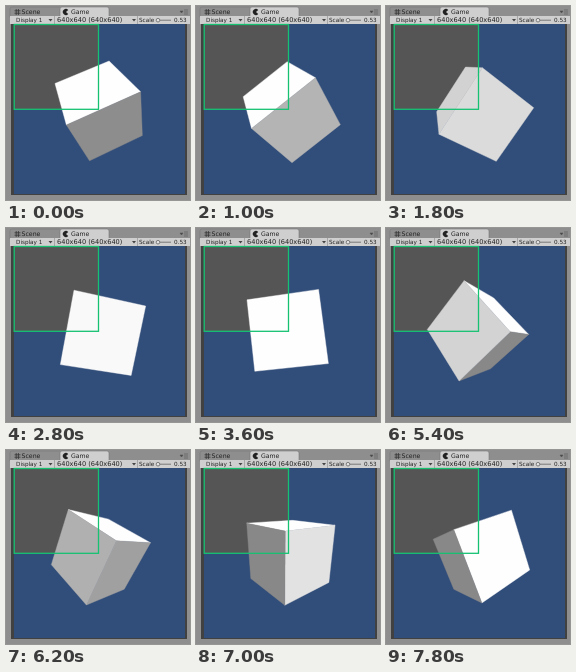
Write an HTML page that moves like this. It is 184 px wide and 194 px high and loops after 8000 ms.

```html
<!DOCTYPE html>
<html lang="en">
<head>
<meta charset="utf-8">
<title>Rotating cube</title>
<style>
html, body { margin: 0; width: 100%; height: 100%; overflow: hidden; background: #8e8e8e; }
svg { display: block; width: 184px; height: 194px; }
text { font: 6.6px "DejaVu Sans", sans-serif; fill: #222; }
.small { font-size: 5.7px; }
</style>
</head>
<body>
<svg viewBox="0 0 184 194">
  <!-- tabs -->
  <rect width="184" height="194" fill="#8e8e8e"/>
  <path d="M54 11V3q0-2 2-2h45q2 0 2 2v8z" fill="#cfcfcf" stroke="#777" stroke-width=".6"/>
  <path d="M4 11V3q0-2 2-2h48" fill="none" stroke="#777" stroke-width=".6"/>
  <path d="M10.2 3v6M12.4 3v6M8.5 4.8h6M8.5 7.2h6" stroke="#333" stroke-width=".8"/>
  <text x="15.5" y="8.2" style="font-size:6.2px">Scene</text>
  <path d="M60 6l2.2-1.9a3 3 0 1 0 0 3.8z" fill="#222"/>
  <text x="65" y="8.2" style="font-size:6.2px">Game</text>
  <path d="M174 5h3l-1.5 2zM178 4h4M178 6h4M178 8h4" fill="#444" stroke="#555" stroke-width=".6"/>

  <!-- toolbar -->
  <rect x="4" y="10" width="180" height="8" fill="#cfcfcf"/>
  <path d="M48.5 10v8M131.5 10v8" stroke="#959595" stroke-width=".7"/>
  <text x="10" y="16" class="small">Display 1</text>
  <text x="51" y="16.2">640x640 (640x640)</text>
  <path d="M42.5 13h4l-2 2.6zM126 13h4l-2 2.6z" fill="#444"/>
  <text x="133" y="16" class="small">Scale</text>
  <path d="M153 14.2h12" stroke="#777"/>
  <circle cx="152" cy="14.2" r="1.8" fill="#e4e4e4" stroke="#555" stroke-width=".7"/>
  <text x="168" y="16" class="small">0.53</text>

  <!-- viewport -->
  <rect x="5" y="18" width="176" height="171" fill="#414141"/>
  <rect x="8" y="18" width="171" height="170" fill="#314d79"/>
  <rect x="8" y="18" width="84.5" height="85" fill="#555"/>
  <g id="cube" stroke-width=".4" stroke-linejoin="round"></g>
  <rect x="8.2" y="18.5" width="84.3" height="84.8" fill="none" stroke="#16c272" stroke-width="1.3"/>
</svg>
<script>
const LOOP = 8000, STEP = 200;
const CX = 93.5, CY = 104, FOCAL = 147, DIST = 2.5;

// Axes: x right, y down, z into the screen
const SPIN = [-1, 2, -3].map(v => v / Math.sqrt(14));
const LIGHT = [.32, -.77, -.557];
const BASE = [[1, 0, 0], [0, 1, 0], [0, 0, 1]];

// time in ms, turn around SPIN in degrees
const TURNS = [
  [0, -80.3], [1000, -62], [2800, -13.5], [4400, 31],
  [5400, 52], [6200, 71], [7800, 116]
];

const dot = (a, b) => a[0] * b[0] + a[1] * b[1] + a[2] * b[2];
const cross = (a, b) => [
  a[1] * b[2] - a[2] * b[1],
  a[2] * b[0] - a[0] * b[2],
  a[0] * b[1] - a[1] * b[0]
];
const scale = (a, k) => a.map(v => v * k);
const corner = (a, b, c) => a.map((v, i) => (v + b[i] + c[i]) / 2);

function turnAt(t) {
  const next = TURNS.findIndex(k => k[0] > t);
  if (next < 0) return TURNS[TURNS.length - 1][1];
  const [t0, a0] = TURNS[next - 1], [t1, a1] = TURNS[next];
  return a0 + (a1 - a0) * (t - t0) / (t1 - t0);
}

function rotate(v, degrees) {
  const a = degrees * Math.PI / 180, c = Math.cos(a), s = Math.sin(a);
  const side = cross(SPIN, v), along = dot(SPIN, v) * (1 - c);
  return v.map((p, i) => p * c + side[i] * s + SPIN[i] * along);
}

function project([x, y, z]) {
  const k = FOCAL / (DIST + z);
  return (CX + x * k).toFixed(2) + "," + (CY + y * k).toFixed(2);
}

const cube = document.getElementById("cube");
const faces = Array.from({ length: 6 }, () =>
  cube.appendChild(document.createElementNS("http://www.w3.org/2000/svg", "polygon")));

function draw(t) {
  const turn = turnAt(t);
  const axes = BASE.map(v => rotate(v, turn));
  faces.forEach((face, i) => {
    const n = scale(axes[i % 3], i < 3 ? 1 : -1);
    const u = axes[(i + 1) % 3], v = axes[(i + 2) % 3];
    const seen = -DIST * n[2] > .5;
    face.style.display = seen ? "" : "none";
    if (!seen) return;
    const points = [[-1, -1], [1, -1], [1, 1], [-1, 1]]
      .map(([a, b]) => project(corner(n, scale(u, a), scale(v, b))));
    const tone = Math.round(Math.min(254, 136 + 212 * Math.max(0, dot(n, LIGHT))));
    const color = `rgb(${tone},${tone},${tone})`;
    face.setAttribute("points", points.join(" "));
    face.setAttribute("fill", color);
    face.setAttribute("stroke", color);
  });
}

const start = performance.now();
function tick() {
  const t = (performance.now() - start) % LOOP;
  draw(Math.floor(t / STEP) * STEP);
  requestAnimationFrame(tick);
}
tick();
</script>
</body>
</html>
```
